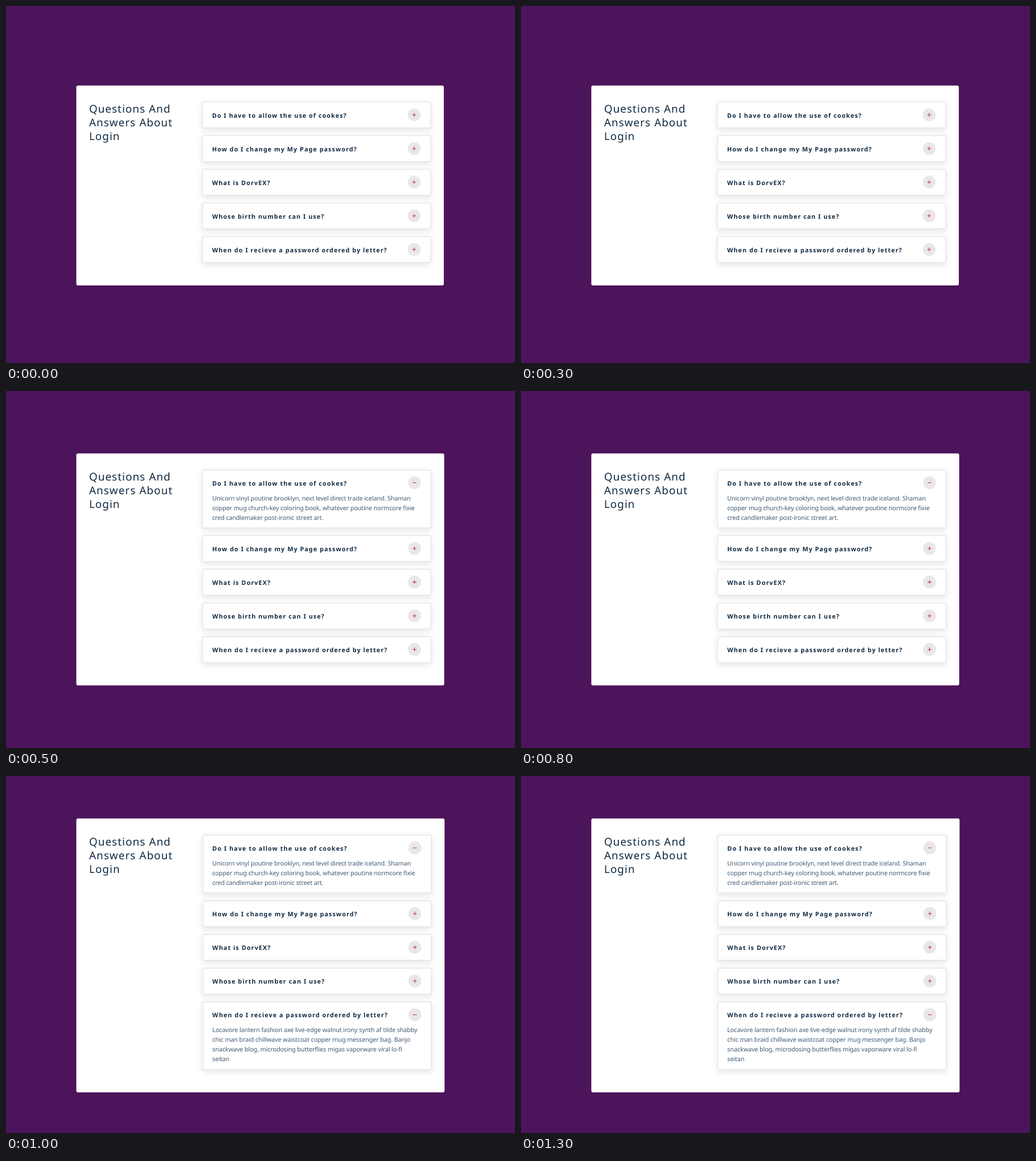
Recreate the animation shown at these times as an HTML page. Size 894 px wide and 626 px high, loop 1.5 s.

```html
<!DOCTYPE html>
<html lang="en">
<head>
<meta charset="utf-8">
<title>Questions</title>
<style>
  html, body { margin: 0; width: 100%; height: 100%; overflow: hidden; background: #4c145a; }
  svg { display: block; }
  text { font-family: "Noto Sans", "Open Sans", sans-serif; fill: #102a42; text-rendering: geometricPrecision; }
  .title { font-size: 18.8px; font-weight: 350; letter-spacing: 1.08px; }
  .question { font-size: 10.8px; font-weight: 700; letter-spacing: 1.05px; }
  .answer { font-size: 10.8px; letter-spacing: -.125px; fill: #415a73; }
  .card { fill: #fff; }
  .item { fill: #fff; stroke: #e6e3e8; stroke-width: 1.4; filter: url(#shadow); }
  .button { fill: #eae6eb; }
  .icon { stroke: #b4345c; stroke-width: 1; }
</style>
</head>
<body>
<svg width="894" height="626" viewBox="0 0 894 626">
  <filter id="shadow" x="-10%" y="-50%" width="120%" height="220%">
    <feDropShadow dx="0" dy="3.5" stdDeviation="5.25" flood-opacity=".1"/>
  </filter>
  <g id="scene"></g>
</svg>
<script>
  const title = ["Questions And", "Answers About", "Login"];
  const faqs = [
    ["Do I have to allow the use of cookes?",
      "Unicorn vinyl poutine brooklyn, next level direct trade iceland. Shaman",
      "copper mug church-key coloring book, whatever poutine normcore fixie",
      "cred candlemaker post-ironic street art."],
    ["How do I change my My Page password?"],
    ["What is DorvEX?"],
    ["Whose birth number can I use?"],
    ["When do I recieve a password ordered by letter?",
      "Locavore lantern fashion axe live-edge walnut irony synth af tilde shabby",
      "chic man braid chillwave waistcoat copper mug messenger bag. Banjo",
      "snackwave blog, microdosing butterflies migas vaporware viral lo-fi",
      "seitan"]
  ];
  // The card grows very slightly with each step.
  const steps = [
    { top: 139.5, open: [], scale: 1 },
    { top: 109.5, open: [0], scale: 1.001 },
    { top: 74.5, open: [0, 4], scale: 1.002 }
  ];
  const STEP = 500, LEFT = 123.5, WIDTH = 645.5;
  const PAD = 28.2, CLOSED = 46.8, GAP = 12.2, LINE = 17;

  const text = (cls, x, y, str) => `<text class="${cls}" x="${x}" y="${y}">${str}</text>`;
  const lines = (cls, x, y, step, list) =>
    list.map((str, i) => text(cls, x, y + i * step, str)).join("");

  function item(y, height, [question, ...answer], open) {
    return `<g transform="translate(221 ${y})">
      <rect class="item" x=".7" y=".7" width="400.6" height="${height - 1.4}" rx="2.4"/>
      ${text("question", 17.4, 28, question)}
      ${open ? lines("answer", 17.4, 53.8, LINE, answer) : ""}
      <circle class="button" cx="372.4" cy="23.2" r="11.25"/>
      <path class="icon" d="M369 23.2h6.8${open ? "" : "M372.4 19.8v6.8"}"/>
    </g>`;
  }

  function draw({ top, open, scale }) {
    let y = PAD, list = "";
    faqs.forEach((faq, i) => {
      const isOpen = open.includes(i);
      const height = CLOSED + (isOpen ? 5 + LINE * (faq.length - 1) : 0);
      list += item(y, height, faq, isOpen);
      y += height + GAP;
    });
    return `<g transform="translate(${LEFT} ${top}) scale(${scale})">
      <rect class="card" width="${WIDTH}" height="${y - GAP + 39.4}" rx="3"/>
      ${lines("title", 22.4, 47.4, 24, title)}${list}
    </g>`;
  }

  const scene = document.getElementById("scene");
  const start = performance.now();
  let current = -1;
  function tick(now) {
    const index = Math.floor(Math.max(0, now - start) / STEP) % steps.length;
    if (index !== current) scene.innerHTML = draw(steps[current = index]);
    requestAnimationFrame(tick);
  }
  tick(start);
</script>
</body>
</html>
```
